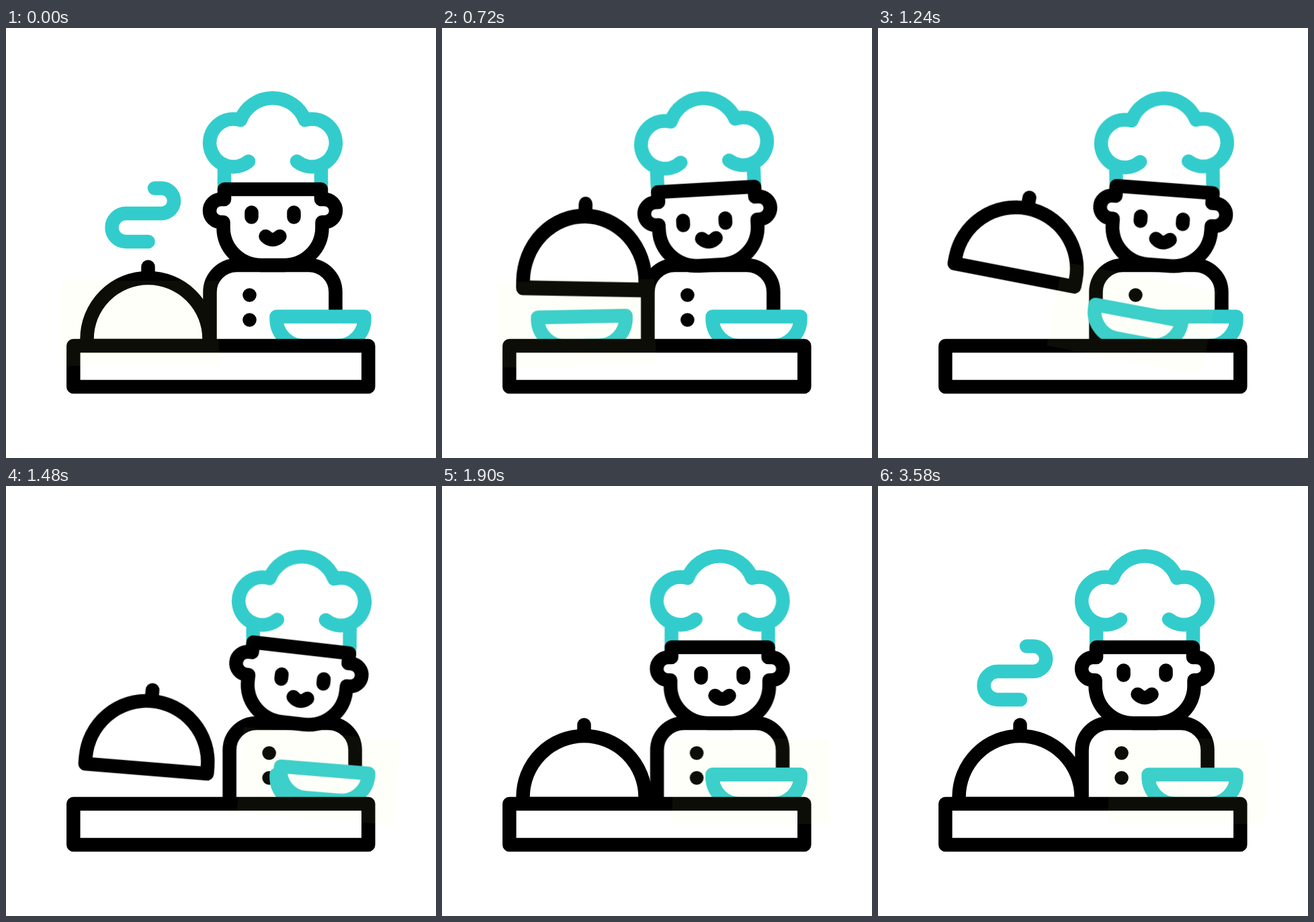
Recreate the animation shown at these times as an HTML page. Size 640 px wide and 640 px high, loop 3600 ms.

```html
<!DOCTYPE html>
<html lang="en">
<head>
<meta charset="utf-8">
<title>Chef at the counter</title>
<style>
  html, body { margin: 0; width: 100%; height: 100%; overflow: hidden; background: #fff; }
  svg {
    display: block; width: 100vw; height: 100vh;
    fill: none; stroke: #000; stroke-width: 20.5;
    stroke-linecap: round; stroke-linejoin: round;
  }
  .teal { stroke: #3cc; }
  .white { fill: #fff; }
  .solid { fill: #000; stroke: none; }
  .tint { fill: #fff08c; fill-opacity: .05; stroke: none; }

  .chef, .head, .hat, .eyes, .mouth, .dome, .bowl, .spare, .steam {
    animation: 3600ms linear infinite;
  }
  .chef { animation-name: chef; }
  .head { animation-name: head; transform-origin: 397px 358px; }
  .hat { animation-name: hat; transform-origin: 397px 240px; }
  .eyes { animation-name: eyes; }
  .mouth { animation-name: mouth; }
  .dome { animation-name: dome; transform-origin: 211.5px 473px; }
  .bowl { animation-name: bowl; transform-origin: 468px 446px; }
  .spare { animation-name: spare; }
  .steam { animation-name: steam; stroke-dasharray: 1 3; }

  @keyframes chef {
    0%, 17.8% { transform: translateX(0); }
    45% { transform: translateX(34px); }
    60.2%, 100% { transform: translateX(0); }
  }
  @keyframes head {
    0% { transform: rotate(0deg); }
    16.67% { transform: rotate(-5deg); }
    40% { transform: rotate(7.2deg); }
    52.2%, 100% { transform: rotate(0deg); }
  }
  @keyframes hat {
    0% { transform: rotate(0deg); }
    16.67% { transform: rotate(2deg); }
    39.5% { transform: rotate(-7deg); }
    52.2%, 100% { transform: rotate(0deg); }
  }
  @keyframes eyes {
    0% { transform: translate(0, 0); }
    16.67% { transform: translate(-6px, 10px); }
    20% { transform: translate(-5.5px, 10px); }
    34.44% { transform: translate(-1px, 8px); }
    41.11%, 45.5% { transform: translate(7px, 8px); }
    60%, 100% { transform: translate(0, 0); }
  }
  @keyframes mouth {
    0% { transform: translate(0, 0); }
    20% { transform: translate(0, 3px); }
    34.44% { transform: translate(3px, 4px); }
    41.11%, 45.5% { transform: translate(7px, 4px); }
    60%, 100% { transform: translate(0, 0); }
  }
  @keyframes dome {
    0%, 2% { transform: translate(0, 0) rotate(0deg) scaleY(1); }
    20% { transform: translate(0, -84.5px) rotate(1deg) scaleY(1.075); }
    31.1% { transform: translate(-11px, -125px) rotate(14deg) scaleY(1); }
    34.44% { transform: translate(-8.5px, -105.5px) rotate(11deg) scaleY(1); }
    41.11% { transform: translate(-3px, -52.5px) rotate(4.7deg) scaleY(1); }
    46.7%, 100% { transform: translate(0, 0) rotate(0deg) scaleY(1); }
  }
  @keyframes bowl {
    0%, 17% { transform: translate(-260px, 0) rotate(0deg); }
    20% { transform: translate(-260px, 0) rotate(-1.2deg); }
    34.44% { transform: translate(-83.5px, -6px) rotate(10.7deg); }
    41.11% { transform: translate(5px, -7px) rotate(4.7deg); }
    45.5%, 100% { transform: translate(0, 0) rotate(0deg); }
  }
  @keyframes spare {
    0%, 63.6% { opacity: 1; }
    73.9%, 100% { opacity: 0; }
  }
  @keyframes steam {
    0% { stroke-dashoffset: 0; opacity: 1; }
    15% { stroke-dashoffset: -1; opacity: 1; }
    15.01% { stroke-dashoffset: 1; opacity: 0; }
    82.22% { stroke-dashoffset: 1; opacity: 0; }
    82.23% { stroke-dashoffset: 1; opacity: 1; }
    99.44%, 100% { stroke-dashoffset: 0; opacity: 1; }
  }
</style>
</head>
<body>
<svg viewBox="0 0 640 640">
  <defs>
    <path id="dish" d="M402.5 429.5H533.5V433A40 40 0 0 1 493.5 473H442.5A40 40 0 0 1 402.5 433Z"/>
  </defs>

  <path class="steam teal" pathLength="1"
    d="M212 318H178.5A21 21 0 0 1 178.5 276H231.3A18.75 18.75 0 0 0 231.3 238.5H221"/>

  <g class="chef">
    <path class="white" d="M303.5 473V393A40 40 0 0 1 343.5 353H450.5A40 40 0 0 1 490.5 393V473"/>
    <g class="solid">
      <circle cx="362.5" cy="397.5" r="10.3"/>
      <circle cx="362.5" cy="434.5" r="10.3"/>
    </g>
    <g class="head">
      <g class="hat teal">
        <path d="M325 206V240M469 206V240"/>
        <path d="M361 198.5A35.5 35.5 0 1 1 349 137A51.5 51.5 0 0 1 445 137A35.5 35.5 0 1 1 433 198.5"/>
      </g>
      <path class="white" d="M325 240V255H320A17 17 0 0 0 320 289H323.5V297A56 56 0 0 0 379.5 353H414.5A56 56 0 0 0 470.5 297V289H474A17 17 0 0 0 474 255H469V240Z"/>
      <path class="eyes" d="M365.5 274.5V281.5M428.5 274.5V281.5"/>
      <path class="mouth" d="M386.5 310Q397 320 407.5 310"/>
    </g>
  </g>

  <use href="#dish" class="spare teal white"/>
  <use href="#dish" class="bowl teal white"/>

  <g class="dome">
    <path d="M211.5 355.5V372"/>
    <path class="white" d="M120.5 473V463A91 91 0 0 1 302.5 463V473Z"/>
  </g>

  <rect class="white" x="100.3" y="473" width="439" height="61"/>
  <rect class="bowl tint" x="343" y="376" width="234" height="127"/>
</svg>
</body>
</html>
```
